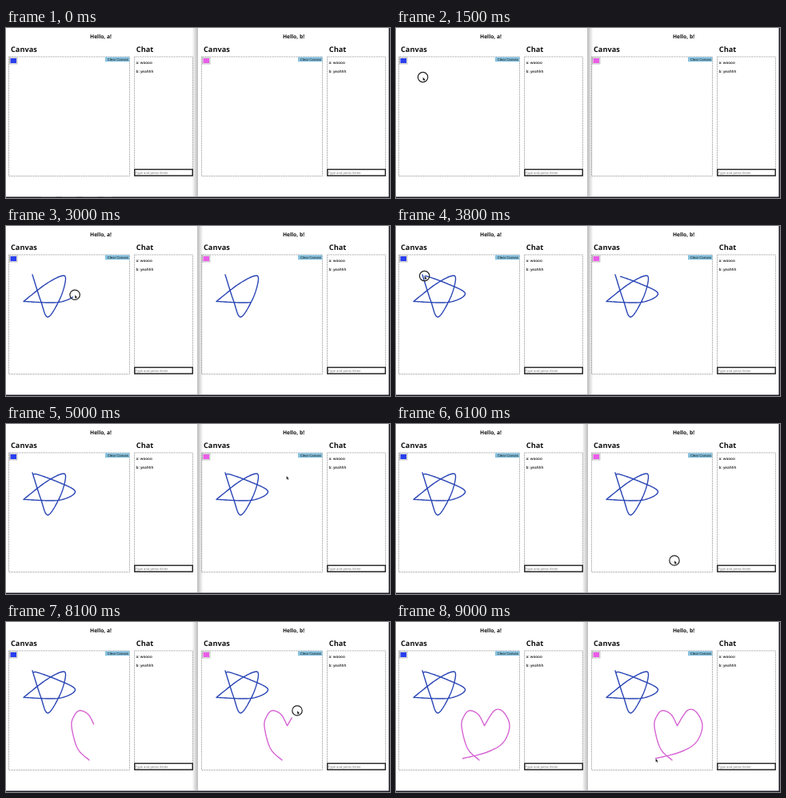
These frames come from a looping animation (480x213 px, 9100 ms). An HTML page:

```html
<!DOCTYPE html>
<html lang="en">
<head>
<meta charset="utf-8">
<title>Shared canvas</title>
<style>
  html, body { margin: 0; width: 100%; height: 100%; overflow: hidden; background: #fff; }
  svg { display: block; width: 480px; height: 213px; }
  text { font-family: "Open Sans", "Noto Sans", sans-serif; fill: #111; text-rendering: geometricPrecision; }
  .title { font-size: 6.7px; font-weight: 700; text-anchor: middle; }
  .head { font-size: 9.2px; font-weight: 700; }
  .chat { font-size: 4.6px; font-weight: 600; }
  .ui { font: 4.3px "Liberation Sans", Arial, sans-serif; }
  .box { fill: none; stroke: #999; stroke-width: .8; stroke-dasharray: 1 .5; }
  .stroke { fill: none; stroke-width: 1.4; stroke-linecap: round; stroke-linejoin: round; }
</style>
</head>
<body>
<svg id="stage" viewBox="0 0 480 213">
  <defs>
    <linearGradient id="shade">
      <stop offset="0" stop-color="#000" stop-opacity=".25"/>
      <stop offset="1" stop-color="#000" stop-opacity="0"/>
    </linearGradient>
  </defs>
</svg>
<script>
const LOOP = 9100, STEP = 100, OFFSET = 241;
const stage = document.getElementById('stage');

// Pointer path: time, x, y. Near-simultaneous repeats make sharp corners.
const track = [
  [600, 70, 216], [1400, 34, 62], [1405, 34, 62], [1635, 33, 61], [1640, 33, 61],
  [1940, 43.5, 94], [2080, 52.5, 114], [2280, 68, 90], [2390, 74.5, 66], [2460, 68, 63],
  [2600, 48, 74], [2720, 22, 94.5], [2725, 22, 94.5], [2920, 66, 95.5], [3010, 86.5, 85],
  [3350, 67, 73.5], [3850, 35, 63], [4200, 68, 88], [4500, 140, 58], [5000, 350.5, 65],
  [5005, 350.5, 65], [6100, 348, 171], [6300, 347, 171], [6700, 318, 165], [7150, 345, 173],
  [7155, 345, 173], [7300, 330.5, 158.5], [7500, 323, 131], [7600, 326, 118], [7720, 333, 111],
  [7850, 344, 116], [7950, 351.5, 130], [7955, 351.5, 130], [8100, 364, 111], [8200, 375, 112.5],
  [8300, 383, 130], [8400, 375, 151], [8500, 355, 163], [8600, 324.5, 171]
];

// Lags are for the left and right windows.
const strokes = [
  { down: 1640, up: 3850, color: '#2945b5', home: 0, lag: [20, 90] },
  { down: 7155, up: 8600, color: '#d664d4', home: OFFSET, lag: [170, 70] }
];
const stillSteps = [36, 43, 44, 51, 62, 76, 87];

function pointAt(t) {
  const i = Math.max(0, track.findLastIndex(p => p[0] <= t));
  const at = k => track[Math.min(Math.max(k, 0), track.length - 1)];
  const [a, b, c, d] = [at(i - 1), at(i), at(i + 1), at(i + 2)];
  const u = c === b ? 0 : Math.max(0, (t - b[0]) / (c[0] - b[0]));
  return [1, 2].map(k => b[k] + u / 2 * (c[k] - a[k] +
    u * (2 * a[k] - 5 * b[k] + 4 * c[k] - d[k] + u * (3 * (b[k] - c[k]) + d[k] - a[k]))));
}

function strokePath({ down, up, home }, t) {
  const end = Math.min(t, up);
  if (end <= down) return '';
  const points = [];
  for (let s = down; s < end; s += 10) points.push(pointAt(s));
  points.push(pointAt(end));
  return 'M' + points.map(([x, y]) => `${(x - home).toFixed(2)} ${y.toFixed(2)}`).join('L');
}

const pane = (x, name, color) => `
  <g transform="translate(${x})">
    <text class="title" x="118.5" y="12.5">Hello, ${name}!</text>
    <text class="head" x="6" y="30">Canvas</text>
    <text class="head" x="162.8" y="30">Chat</text>
    <rect class="box" x="3.5" y="36" width="151" height="149.5"/>
    <rect class="box" x="160.5" y="36" width="73" height="149.5"/>
    <rect x="4.5" y="37" width="9.5" height="8" fill="#eee" stroke="#aaa" stroke-width=".7"/>
    <rect x="5.5" y="38" width="7.5" height="6" fill="${color}"/>
    <rect x="124" y="36.4" width="30.3" height="5.8" fill="#86c1de"/>
    <text class="ui" x="126.8" y="40.8">Clear Canvas</text>
    <text class="chat" x="162.6" y="45">a: woooo</text>
    <text class="chat" x="162.6" y="55.6">b: yeahhh</text>
    <rect x="160.8" y="177.2" width="72.4" height="7.8" fill="#fff" stroke="#111" stroke-width="1.3"/>
    <text class="ui" x="161.6" y="182.6" style="fill:#777">Type and press Enter</text>
    ${strokes.map(s => `<path class="stroke" stroke="${s.color}"/>`).join('')}
  </g>`;

stage.innerHTML += `
  <rect width="480" height="213" fill="#fff"/>
  ${pane(0, 'a', '#2a3fee')}${pane(OFFSET, 'b', '#ea5ce8')}
  <rect id="shadow" width="7" height="211" fill="url(#shade)"/>
  <path d="M239.5 0V211" stroke="#bbb" stroke-width=".8"/>
  <path d="M479.3 0V213M0 212.2H480" stroke="#1c1b26" stroke-width="1.6"/>
  <path id="dock" d="M44 211.5H133" stroke="#aaa" stroke-width=".8" stroke-dasharray="18 8"/>
  <g id="pointer">
    <circle id="ring" r="6.2" fill="none" stroke="#222" stroke-width="1.2"/>
    <path d="M0 0V4.6L1.1 3.7L1.9 5.3L2.7 4.9L2 3.4H3.3Z" fill="#111" stroke="#fff" stroke-width=".3"/>
  </g>`;

const [shadow, dock, pointer, ring] = ['shadow', 'dock', 'pointer', 'ring'].map(id => document.getElementById(id));
const paths = [...stage.querySelectorAll('.stroke')];
const show = (el, on) => el.setAttribute('visibility', on ? 'visible' : 'hidden');
const within = (t, from, to) => t >= from && t < to;

function draw() {
  let step = Math.floor(performance.now() % LOOP / STEP);
  while (stillSteps.includes(step)) step--;
  const t = step * STEP;
  const pressed = within(t, 1400, 4000) || within(t, 5900, 6250) || within(t, 7100, 8650);

  paths.forEach((path, i) => {
    const stroke = strokes[i % 2], side = i >> 1;
    path.setAttribute('d', strokePath(stroke, t - stroke.lag[side]));
  });
  const flip = within(t, 1200, 5900) ? 1 : -1;
  shadow.setAttribute('transform', `translate(239.5) scale(${flip} 1)`);
  show(dock, t < 300);
  show(pointer, t >= 600);
  show(ring, t >= 600 && pressed);
  pointer.setAttribute('transform', `translate(${pointAt(t)})`);
  requestAnimationFrame(draw);
}
draw();
</script>
</body>
</html>
```
